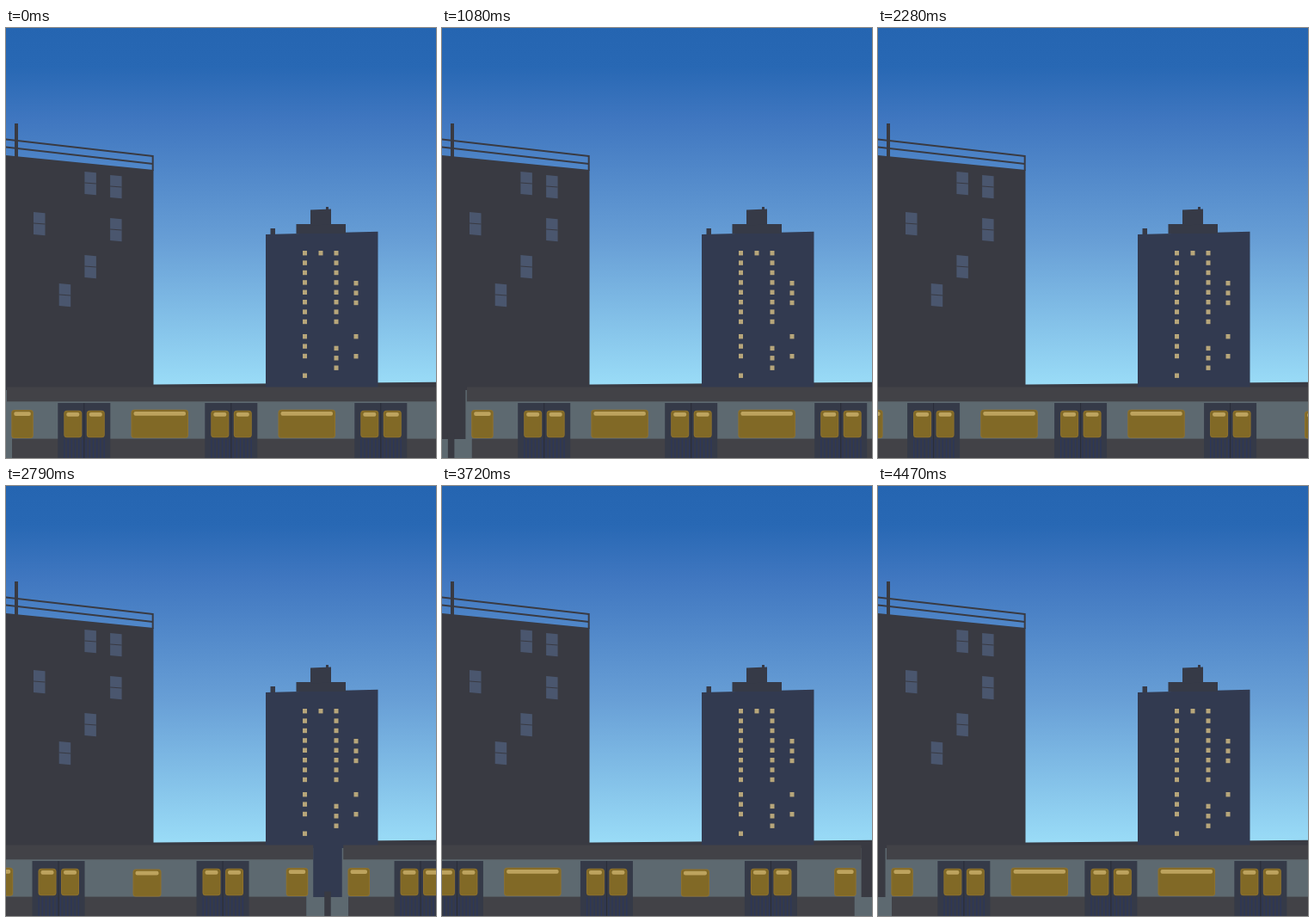
An HTML page with a canvas that plays this animation: 500x500 px, repeating every 4.5 s.

```html
<!DOCTYPE html>
<html lang="en">
<head>
<meta charset="utf-8">
<title>City train</title>
<style>
  html, body { margin: 0; width: 100%; height: 100%; overflow: hidden; }
  canvas { display: block; width: 500px; height: 500px; }
</style>
</head>
<body>
<canvas id="stage" width="500" height="500"></canvas>
<script>
const ctx = document.getElementById('stage').getContext('2d');
const LOOP = 4500, STEP = 30, SPEED = 20.503, CAR = 731, PITCH = CAR + 35;
const NIGHT = '#393a42', TOWER = '#323a50', CROWN = '#363a47';
const ROOF = '#424247', BODY = '#5d6970', DOOR = '#353a48';

function rect(color, x, y, w, h) {
  ctx.fillStyle = color;
  ctx.fillRect(x, y, w, h);
}

function round(color, x, y, w, h, r) {
  ctx.fillStyle = color;
  ctx.beginPath();
  ctx.roundRect(x, y, w, h, r);
  ctx.fill();
}

// A box whose top and bottom edges drop by `drop` from left to right.
function slanted(color, x, y, w, h, drop) {
  ctx.fillStyle = color;
  ctx.beginPath();
  ctx.moveTo(x, y);
  ctx.lineTo(x + w, y + drop);
  ctx.lineTo(x + w, y + h + drop);
  ctx.lineTo(x, y + h);
  ctx.fill();
}

function drawSky() {
  const sky = ctx.createLinearGradient(0, 0, 0, 415);
  sky.addColorStop(0, '#2565b1');
  sky.addColorStop(0.11, '#2868b4');
  sky.addColorStop(0.26, '#4077c0');
  sky.addColorStop(0.6, '#689fd6');
  sky.addColorStop(1, '#9adcf7');
  rect(sky, 0, 0, 500, 500);
  slanted(NIGHT, 0, 416, 500, 90, -4.3);
}

function drawBlock() {
  slanted(NIGHT, 0, 148, 171.5, 400, 17);
  rect(NIGHT, 10, 111, 4, 40);
  for (const y of [128.5, 137.5]) slanted(NIGHT, 0, y, 171, 2, 19.5);
  rect(NIGHT, 169.7, 148, 2, 18);
  for (const [column, y] of [[0, 214], [1, 297], [2, 167], [2, 264], [3, 171], [3, 221]]) {
    const x = 32 + column * 29.7;
    slanted('#4a566e', x, y, 13.5, 26, 1.3);
    slanted(NIGHT, x, y + 12.5, 13.5, 1, 1);
  }
}

function drawLights(x, y, count) {
  for (let i = 0; i < count; i++) rect('#b7a67a', x, y + i * 11.4, 5, 5.4);
}

function drawTower() {
  slanted(TOWER, 302, 240, 130.5, 260, -3.2);
  rect(CROWN, 307.5, 233, 5.5, 7);
  rect(CROWN, 337.5, 228, 57.5, 11);
  slanted(CROWN, 354, 211.5, 24, 18, -1);
  rect(CROWN, 372, 208, 3, 4);
  for (const x of [345, 381.5]) drawLights(x, 259, 8);
  drawLights(345, 356, 3);
  drawLights(345, 401.5, 1);
  drawLights(363.5, 259, 1);
  drawLights(381.5, 369.7, 3);
  drawLights(404.5, 294, 3);
  for (const y of [356, 379]) drawLights(404.5, y, 1);
}

function drawPane(x, y, w, h) {
  round('#8e712d', x, y, w, h, 3.5);
  round('#816926', x + 1, y + 1, w - 2, h - 2, 2.5);
  round('#bda35e', x + 3, y + 2.3, w - 6, 4.7, 2);
}

function drawDoor(x) {
  rect(DOOR, x, 436, 61, 64);
  rect('#292c38', x + 30, 436, 1, 64);
  for (let i = 0; i < 12; i++) rect('#2d375a', x + 7 + i * 4.2, 478, 1.3, 22);
  for (const offset of [7, 33.5]) drawPane(x + offset, 444.7, 21, 31.5);
}

function drawCar(x) {
  rect(BODY, x - 43, 478, 49, 22);
  rect(NIGHT, x - 22, 471.5, 7.5, 28.5);
  rect(BODY, x - 1.5, 421, CAR + 1.5, 57);
  rect(ROOF, x, 417.5, CAR, 16.8);
  rect(ROOF, x + 6, 477.6, CAR - 14, 23);
  for (const end of [5.3, CAR - 31.5]) drawPane(x + end, 444, 25.5, 33);
  for (const wide of [144.5, 315.5]) drawPane(x + wide, 443.7, 66.5, 33);
  drawPane(x + 521.3, 445.5, 33, 32);
  for (const door of [59.3, 230.3, 404.3, 595.3]) drawDoor(x + door);
}

function draw(now) {
  const step = Math.floor(now % LOOP / STEP);
  const x = ((1 - SPEED * step) % PITCH + PITCH) % PITCH;
  drawSky();
  drawBlock();
  drawTower();
  drawCar(x - PITCH);
  drawCar(x);
}

const start = performance.now();
function tick() {
  draw(performance.now() - start);
  requestAnimationFrame(tick);
}
tick();
</script>
</body>
</html>
```
